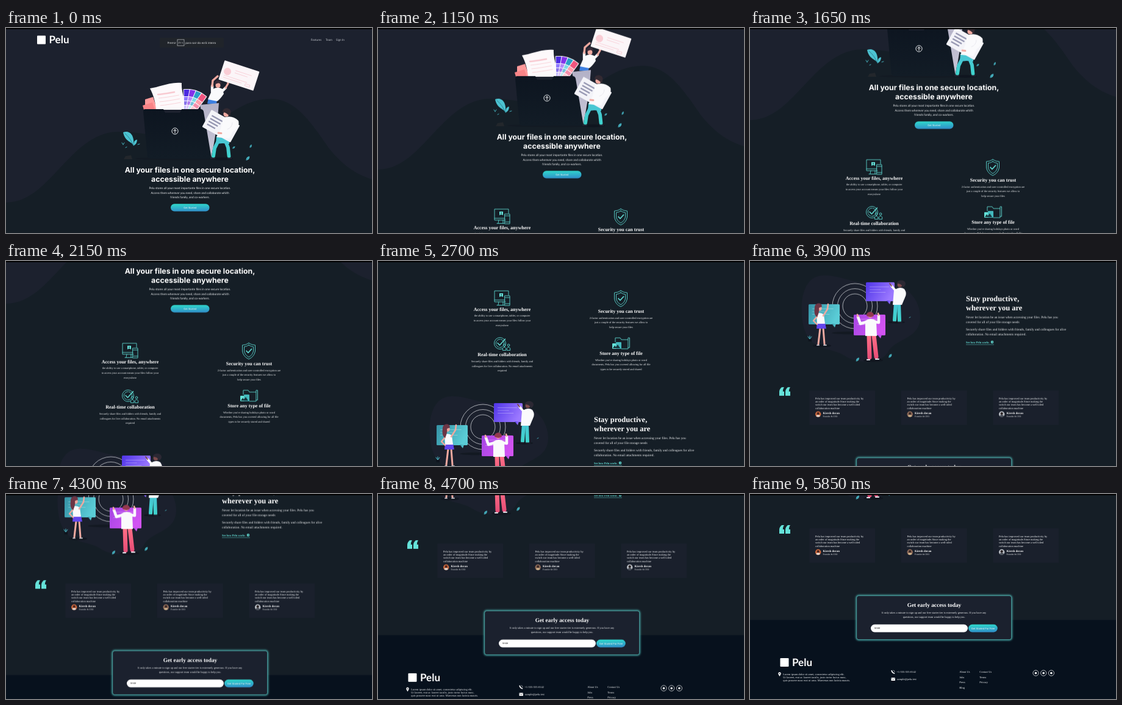
Write an HTML page that moves like this. It is 600 px wide and 336 px high and loops after 5.9 s.

```html
<!DOCTYPE html>
<html lang="en">
<head>
<meta charset="utf-8">
<title>Landing page scroll</title>
<style>
html, body { margin: 0; width: 100%; height: 100%; overflow: hidden; background: #151e26; }
#stage { position: relative; width: 600px; height: 336px; overflow: hidden; }
svg { position: absolute; left: 0; top: 0; display: block; }
#page { animation: scroll 5900ms linear infinite; will-change: transform; }
#toast { animation: toast 5900ms linear infinite; }
#bar { position: absolute; left: 0; top: 0; width: 600px; height: 2px; background: #000; }

@keyframes scroll {
  0%, 13.9% { transform: translateY(0); }
  19.492% { transform: translateY(-54px); }
  36.441% { transform: translateY(-216px); }
  54.237% { transform: translateY(-380px); }
  66.102% { transform: translateY(-500px); }
  79.661% { transform: translateY(-631px); }
  82.288%, 100% { transform: translateY(-656px); }
}
@keyframes toast {
  0%, 11% { opacity: 1; }
  15%, 100% { opacity: 0; }
}

text { fill: #f1f3f5; font-family: "Liberation Serif", serif; font-size: 4.5px; text-rendering: geometricPrecision; white-space: pre; }
.mid { text-anchor: middle; }
.brand { font: 700 17px Lato, sans-serif; fill: #fff; }
.hero { font: 700 12.3px Inter, sans-serif; fill: #fff; }
.intro { font: 4.8px Lato, sans-serif; }
.nav { font: 4.7px Lato, sans-serif; fill: #c3c7cd; }
.cta { font: 4.2px Lato, sans-serif; }
.feat { font-weight: 700; font-size: 8px; fill: #fff; }
.h2 { font-weight: 700; font-size: 12.5px; fill: #fff; }
.h3 { font-weight: 700; font-size: 9.375px; fill: #fff; }
.para { font-size: 5.4px; }
.link { font-weight: 700; fill: #65e2d9; }
.name { font-weight: 700; font-size: 4.8px; fill: #fff; }
.role { font-size: 3.6px; }
.ui { font: 4.17px "Liberation Sans", sans-serif; }
.dark { fill: #222; }
.tip { font: 4.5px "Open Sans", sans-serif; }
.icon { fill: none; stroke: #5cd5cf; stroke-width: .9; stroke-linejoin: round; stroke-linecap: round; }
.limb { fill: none; stroke-linecap: round; stroke-linejoin: round; }
</style>
</head>
<body>
<div id="stage">
  <svg id="page" width="600" height="992" viewBox="0 0 600 992"></svg>
  <svg id="toast" width="600" height="40" viewBox="0 0 600 40">
    <rect x="252" y="16" width="105" height="16" rx="1" fill="#20242a"/>
    <rect x="281" y="19" width="11" height="10" fill="none" stroke="#c4c6c9" stroke-width=".7"/>
    <text class="tip" x="264.5" y="25.8">Premir</text>
    <text class="tip mid" x="286.5" y="25.8">F11</text>
    <text class="tip" x="294.3" y="25.8">para sair do ecrã inteiro</text>
  </svg>
  <div id="bar"></div>
</div>
<script>
const BRAND = 'Pelu';
const SKIN = '#f0a9a0', TEAL = '#4cc3d1', WHITE = '#fafafc';

const text = (x, y, cls, s) => `<text x="${x}" y="${y}" class="${cls}">${s}</text>`;
const lines = (x, y, gap, cls, list) => list.map((s, i) => text(x, y + i * gap, cls, s)).join('');
const rect = (x, y, w, h, fill, rx = 0, more = '') =>
  `<rect x="${x}" y="${y}" width="${w}" height="${h}" rx="${rx}" fill="${fill}" ${more}/>`;
const circle = (x, y, r, fill, more = '') => `<circle cx="${x}" cy="${y}" r="${r}" fill="${fill}" ${more}/>`;
const oval = (x, y, rx, ry, fill) => `<ellipse cx="${x}" cy="${y}" rx="${rx}" ry="${ry}" fill="${fill}"/>`;
const shape = (d, fill, more = '') => `<path d="${d}" fill="${fill}" ${more}/>`;
const limb = (d, color, w) => `<path class="limb" d="${d}" stroke="${color}" stroke-width="${w}"/>`;
const at = (x, y, body, turn = 0) => `<g transform="translate(${x} ${y}) rotate(${turn})">${body}</g>`;
const icon = (x, y, d) => at(x, y, `<path class="icon" d="${d}"/>`);
const leaf = (x, y, turn, k = 1) => at(x, y,
  shape(`M0 ${4 * k}C${-3 * k} 0 ${-2 * k} ${-3 * k} 0 ${-5 * k}C${3 * k} ${-2 * k} ${2.5 * k} ${k} 0 ${4 * k}`, TEAL) +
  limb(`M0 ${4 * k}L0 ${-3 * k}`, '#123', .4), turn);
const grad = (id, a, b, x2, y2) =>
  `<linearGradient id="${id}" x2="${x2}" y2="${y2}"><stop stop-color="${a}"/><stop offset="1" stop-color="${b}"/></linearGradient>`;

const defs = () => '<defs>' +
  grad('btn', '#2fdacb', '#3093c9', .12, 1) + grad('violet', '#4f35e8', '#9b78ff', 1, .4) +
  grad('teal', '#3591a5', '#5accd6', 1, .3) + grad('pink', '#a546e4', '#d253f2', 1, .4) +
  grad('legs', '#ff6f86', '#e84f78', 0, 1) + grad('pants', '#48c6d4', '#3fd3cd', 0, 1) +
  grad('folder', '#0d1520', '#121c26', 0, 1) + grad('grey', '#b3b1c6', '#c9c7d8', 0, 1) +
  '<filter id="glow" x="-10%" y="-20%" width="120%" height="140%"><feGaussianBlur stdDeviation="1.6"/></filter></defs>';

const logo = (x, y) => rect(x + 3, y - 12.5, 14, 14, '#fff', 1) + text(x + 22.5, y, 'brand', BRAND);

function header() {
  return rect(0, 0, 600, 992, '#151e26') +
    shape('M0 0H600V248C575 240 555 228 530 198C502 158 476 116 434 116C374 116 345 172 290 177C245 180 225 170 185 170C105 170 73 286 0 286Z', '#1c212e') +
    logo(48, 25) +
    text(499.7, 21, 'nav', 'Features') + text(524, 21, 'nav', 'Team') + text(541, 21, 'nav', 'Sign In');
}

function certificate() {
  const bars = [[22, 10, 28], [22, 14, 22], [6, 23, 40], [6, 26.5, 32]];
  return at(358.5, 53, rect(0, 0, 60, 33, '#fbf5f8', 1) + circle(10, 16, 6, '#f9cdd5') +
    bars.map(([x, y, w]) => rect(x, y, w, .9, '#f8cfd7')).join('') +
    rect(44, 26, 8, 3.5, 'none', 0, 'stroke="#f5bcc7" stroke-width=".6"'), 18);
}

// Colour cards fanned out from one point behind the folder edge.
function swatches() {
  const tones = [['#4b2be0', '#8f78ff'], ['#8432ea', '#b889fa'], ['#2b9fc8', '#7edbe5'], ['#f0557f', '#ff9dab']];
  return tones.map(([a, b], i) => at(297, 148,
    rect(-5.5, -48, 11, 48, WHITE, 1) + rect(-4.5, -47, 9, 11, a) + rect(-4.5, -35, 9, 6, b) +
    rect(-4.5, -28, 9, 6, a, 0, 'opacity=".65"') + rect(-4.5, -21, 9, 7, b, 0, 'opacity=".5"'), i * 12.3 - 1)).join('');
}

function upperFigure() {
  return shape('M330 124L332 114L346 117L345 125Z', '#3d7fe0') +
    shape('M338 101Q346 95 355 100L357 108Q350 118 346 120L331 117Z', WHITE) +
    limb('M338 105L338 95', WHITE, 4.4) + limb('M355 103L360 98', WHITE, 4.2) +
    limb('M338 95L339 86L347 79', SKIN, 3.4) + limb('M360 98L364 91L364 83', SKIN, 3.2) +
    certificate() + circle(347.5, 94, 4, SKIN) +
    shape('M342 93C341 84 353 83 353.5 92C350 89 346 90 342 93Z', '#372a37');
}

function lowerFigure() {
  const note = [0, 1, 2, 3].map(i => rect(5, 7 + i * 5.3, 21 - i * 2, 2.3, '#9495b0')).join('');
  return oval(353, 214.5, 19, 2.2, '#0f151f') +
    limb('M349 183L342 197L340 210', 'url(#pants)', 5.8) + limb('M359 183L364 196L365.5 210', 'url(#pants)', 5.8) +
    shape('M345 177H366L366 190L355 189L344 190Z', '#49c7d3') +
    limb('M336 213.5H342M364 213.5H369', '#242635', 2.2) +
    at(337, 134, rect(0, 0, 53, 32, '#f3f3f8', 1) + note, 29) +
    shape('M356 147Q371 142 381 152Q384 162 372 169L366 181L345 179L352 165Z', WHITE) +
    limb('M372 150Q376 158 367 167L354 172', WHITE, 6) + limb('M371 155Q371 163 363 166', '#dcdce6', .6) +
    limb('M353 172.5L348 172', SKIN, 2.8) +
    circle(361, 141, 4.6, SKIN) + shape('M355 138C355 129 369 130 368.5 138L367 145C364 142 361 138 355 138Z', '#332a32');
}

function plants() {
  return shape('M209 193C207 186 195 187 192 171C204 167 211 177 209 193Z', TEAL) +
    limb('M209 193Q204 180 195 173', '#1b5a6d', .6) + shape('M209 193Q209 183 215 183Q215 190 209 193', TEAL) +
    limb('M192 191l-2 -3M192 191l2 -3M216 191l3 -1M198 195l-2 1', TEAL, .9) +
    shape('M193 215L196 210L205 208.5L207 215Z', '#23272c') +
    leaf(373, 196, 50, .65) + leaf(401, 194, 28, .7) + leaf(396, 214, 40);
}

function heroArt() {
  const sheet = [0, 1, 2, 3].map(i =>
    limb(`M${249 + i * 1.4} ${109 + i * 6}q12 -1 ${i ? 33 : 27} ${i ? -5 : -4}`, '#f8c9d0', i ? .8 : 2.4)).join('');
  return oval(292, 214, 80, 2.5, '#131a23') +
    shape('M228 117L241 113L248 134H228Z', '#ff9a9b') + shape('M224 127L240 122L244 134H226Z', '#f88487') +
    shape('M236 99C254 96 270 88 288 90C287 105 294 120 298 134H246C245 122 242 110 236 99Z', '#fdf9fb') + sheet +
    swatches() + upperFigure() +
    shape('M318 126L349 123Q346 170 336 213Z', 'url(#grey)') +
    shape('M228 133H258L261 139H285L288 133H319Q323 133 324 137L337 214H237Q232 214 231.5 209L225 137Q225 133 228 133Z', 'url(#folder)') +
    circle(277, 169, 5.1, 'none', 'stroke="#e9ecef" stroke-width="1"') +
    limb('M277 172V166.5M274.8 168.6L277 166.3L279.2 168.6', '#fff', 1) +
    lowerFigure() + plants();
}

function hero() {
  return heroArt() +
    lines(301.5, 237, 14.6, 'hero mid', ['All your files in one secure location,', 'accessible anywhere']) +
    lines(301.5, 263.8, 7.8, 'intro mid', [
      `${BRAND} stores all your most importante files in one secure location.`,
      'Access them wherever you need, share and collaborate whith',
      'friends family, and co-workers.']) +
    rect(270, 288.3, 63.5, 12.2, 'url(#btn)', 6.1) + text(301.7, 296, 'cta mid', 'Get Started');
}

function features() {
  const L = 203.5, R = 398.5;
  const people = [17, 24].map(x =>
    circle(x, 13, 1.8, '#151e26', 'class="icon"') +
    shape(`M${x - 2.7} 21.5V18Q${x} 14.5 ${x + 2.7} 18V21.5Z`, '#151e26', 'stroke="#5cd5cf" stroke-width=".9"')).join('');
  return icon(190, 350, 'M19 19H1V1H24V8M1 16H18M8 19L7 24M15 19V24M5 24.5H17M18 9H26V25H18ZM18 12H26M18 22H26') +
    at(190, 350, shape('M9 5H15V11L12 9.5L9 11Z', '#65e2d9') + circle(12, 7.4, .9, '#151e26')) +
    icon(387, 350, 'M11 .7Q16 4 21.5 4V14Q20 23 11 27Q2 23 .5 14V4Q6 4 11 .7ZM11 4Q15 6.5 18.5 6.7V14Q17 20.5 11 23.7Q5 20.5 3.5 14V6.7Q7 6.5 11 4Z') +
    at(387, 350, limb('M7 13.5L10 16.5L15.5 10.5', '#65e2d9', 1.7)) +
    at(190, 427, circle(10, 10, 9.5, 'none', 'class="icon"') + circle(10, 10, 6.7, 'none', 'class="icon" stroke-dasharray="5 1.5"') +
      limb('M6 9.5L9.5 13L18.5 3', '#65e2d9', 1.5) + people) +
    icon(384, 427, 'M5 8V1H13L15 4H26V19H15M26 4V1H28.5V17H26') +
    at(384, 427, rect(0, 10, 9, 9, '#65e2d9', 1) + rect(6, 8, 9, 11, '#43b9bd', 1) + shape('M1 18L4 13.5L6 16L9 12L13 18Z', '#17333b')) +
    text(L, 383.5, 'feat mid', 'Access your files, anywhere') +
    lines(L, 393, 7.8, 'mid', ['the ability to use a smartphone, tablet, or computer', 'to access your account means your files follow your', 'everywhere']) +
    text(R, 386.5, 'feat mid', 'Security you can trust') +
    lines(R, 396.5, 7.7, 'mid', ['2-factor authentication and user-controlled encryption are', 'just a couple of the security features we allow to', 'help secure your files']) +
    text(L, 457.9, 'feat mid', 'Real-time collaboration') +
    lines(L, 468, 7.7, 'mid', ['Securely share files and folders with friends, family and', 'colleagues for live collaboration. No email attachments', 'required']) +
    text(R, 455.7, 'feat mid', 'Store any type of file') +
    lines(R, 465.6, 7.8, 'mid', ['Whether you\'re sharing holidays photo or word', `documents, ${BRAND} has you covered allowing for all file`, 'types to be securely stored and shared']);
}

function bubble(x, y, w, h, fill) {
  const bars = [.68, .4, .56].map((k, i) => rect(x + 6, y + 7 + i * 4.5, w * k, 1.1, '#fff', .5, 'opacity=".3"')).join('');
  return rect(x, y, w, h, fill, 1.5) + shape(`M${x + w - 13} ${y + h - 1}h7l-2 6z`, fill) + bars;
}

function teamArt() {
  const rings = [20, 28.5, 37].map(r => circle(172, 74, r, 'none', 'stroke="#e6e8ec" stroke-width=".7"')).join('');
  const rightFigure =
    limb('M239 69L237 97', 'url(#pants)', 6) + limb('M244 69L245 98', 'url(#pants)', 6) + limb('M234 100H238M243 100.5H249', '#20212e', 2) +
    shape('M236 48Q246 41 253 46Q258 53 254 60L249 72H234Z', WHITE) + limb('M252 50L251 61L240 66', WHITE, 4.5) + limb('M238 48L232 41', WHITE, 3.6) + limb('M232 41L229 37', '#7b4a4b', 2) +
    circle(245.5, 39, 4, '#7b4a4b') + shape('M241 37C240 31 254 29 255 37Q255 42 250 43Q249 37 241 37Z', '#2b2833');
  const leftFigure =
    limb('M115 110L112 136', SKIN, 3) + limb('M120 110L122 136', SKIN, 3) + limb('M110 138H113M121 138H125', '#e9e6ee', 1.7) +
    shape('M110 101H123L125 111H109Z', '#6346ec') + shape('M109 87Q115 83 121 88L123 103H110Z', WHITE) +
    limb('M120 90L127 79L128 71', SKIN, 2.5) + limb('M110 91L104 98L110 104', SKIN, 2.4) +
    circle(114, 78, 3.7, SKIN) + shape('M106 76C106 68 118 67 118 75L113 77Q114 84 110 92Q104 89 106 76Z', '#6c3545');
  const frontFigure =
    limb('M195 122L196 158', 'url(#legs)', 7) + limb('M203 122L207 157', 'url(#legs)', 7) + limb('M192 162H196M206 161H211', '#e9e6ee', 2.2) +
    shape('M189 98Q198 92 207 98L208 123H189Z', WHITE) + limb('M191 100L181 103L177 92', WHITE, 4.5) + limb('M205 100L211 101L211 90', WHITE, 4.5) +
    limb('M177 91L176 88M211 89L210 86', SKIN, 2.6) + circle(197, 89, 4.4, SKIN) + shape('M191 90C190 82 203 81 203 90Q198 94 191 90Z', '#93394f');
  return at(0, 500,
    shape('M118 24C148 22 170 40 212 36C258 32 280 66 279 94C277 130 237 126 226 150C216 168 176 169 156 156C132 140 102 150 89 112C80 82 82 26 118 24Z', '#1b202d') +
    oval(160, 118, 26, 2.2, '#131922') + oval(240, 100.5, 14, 1.9, '#11161f') + oval(118, 139, 15, 2.3, '#11161f') + oval(202, 163, 16, 2.4, '#11161f') +
    rings + bubble(190, 35, 47, 31, 'url(#violet)') + bubble(96, 71, 51, 33, 'url(#teal)') +
    rightFigure + leftFigure + bubble(170, 88, 52, 34, 'url(#pink)') + frontFigure +
    leaf(176, 162, 40, .9) + leaf(229.5, 156, 38, .9) +
    limb('M98 128L95 124M98 128V123M98 128L101 124', TEAL, 1) + rect(95.5, 128, 5.5, 4, '#0e141d', .5) + limb('M261 93l2 -1', TEAL, .8));
}

function productive() {
  return teamArt() +
    lines(354, 566, 14.7, 'h2', ['Stay productive,', 'wherever you are']) +
    lines(354, 593.8, 8, 'para', [`Never let location be an issue when accessing your files. ${BRAND} has you`, 'covered for all of your file storage needs']) +
    lines(354, 614.2, 8, 'para', ['Securely share files and folders with friends, family and colleagues for alive', 'collaboration. No email attachments required.']) +
    text(354, 634.7, 'link', `See how ${BRAND} works`) +
    circle(397, 633, 2.3, '#65e2d9') + limb('M395.9 633H398M397.2 632.1L398.1 633L397.2 633.9', '#151e26', .5) +
    rect(354, 636.8, 46, .5, '#65e2d9');
}

function avatar(x, y, back, body, head) {
  return circle(x, y, 4.7, back) + shape(`M${x - 3.6} ${y + 3}Q${x} ${y - 1} ${x + 3.6} ${y + 3}Q${x} ${y + 6.2} ${x - 3.6} ${y + 3}`, body) + circle(x, y - 1, 2.1, head);
}

function quotes() {
  const mark = shape('M4 0H8Q5.6 3 5.8 7H8V14H0V8Q0 3 4 0Z', '#65e2d9');
  const tones = [['#c9683e', '#e9ddd5', '#4c251f'], ['#8d6a58', '#d0b48e', '#3a2a27'], ['#b9bdc3', '#404650', '#2b2526']];
  return at(48, 707, mark) + at(58, 707, mark) + tones.map((tone, i) => {
    const x = 97.3 + i * 150.5;
    return rect(x, 712.3, 108, 56.5, '#1a202c', 1) +
      lines(x + 9.6, 726.6, 5.3, '', [`${BRAND} has improved our team productivity by`, 'an order of magnitude.Since making the', 'switch our team has become a well-oiled', 'collaboration machine']) +
      avatar(x + 14.4, 751.2, ...tone) + text(x + 22.2, 751, 'name', 'Kiresh dovan') + text(x + 22.2, 755.6, 'role', 'Founder &amp; CEO');
  }).join('');
}

function signup() {
  return rect(0, 862.5, 600, 130, '#07111d') +
    rect(174.7, 822.7, 254, 72, 'none', 3.5, 'stroke="#4fc4bf" stroke-width="2.2" filter="url(#glow)"') +
    rect(174.7, 822.7, 254, 72, '#1b212e', 3.5, 'stroke="#4fa9a8" stroke-width=".9"') +
    text(302, 841, 'h3 mid', 'Get early access today') +
    lines(301.7, 852.3, 6.6, 'mid', ['It only takes a minute to sign up and our free starter tier is extremely generous. If you have any', 'questions, our support team would be happy to help you.']) +
    rect(198, 869.8, 159, 12.6, '#fff', 6.3) + text(204.2, 877.4, 'ui dark', 'teste') +
    rect(358, 869.8, 47.8, 12.6, 'url(#btn)', 6.3) + text(381.9, 877.5, 'ui mid', 'Get Started For Free');
}

function footer() {
  const pin = shape('M48.5 955Q46.3 952 46.3 950.3A2.2 2.2 0 0 1 50.7 950.3Q50.7 952 48.5 955Z', '#fff') + circle(48.5, 950.4, .8, '#07111d');
  const phone = limb('M232.2 945.5Q233 949 236.6 950', '#fff', 1.6) + limb('M235 945Q237 945.4 237.2 947.4', '#fff', .6);
  const mail = rect(231.5, 957, 6.4, 5, '#fff', .5) + limb('M232.2 958L234.7 960L237.2 958', '#07111d', .6);
  const social = [468.5, 481.2, 493.9].map(x =>
    circle(x, 949.5, 4.6, 'none', 'stroke="#fff" stroke-width=".7"') + circle(x, 949.5, 1.8, '#fff')).join('');
  return logo(46.5, 937.5) + pin + phone + mail + social +
    lines(54.3, 952.6, 5.2, '', ['Lorem ipsum dolor sit amet, consectetur adipiscing elit.', 'Ut laoreet, erat ac laoreet iaculis, justo tortor luctus nunc,', 'quis posuere nunc erat ut urna. Maecenas non lacinia mauris.']) +
    text(240.3, 949, '', '+1-555-555-0142') + text(240.7, 961, '', 'sample@pelu.test') +
    lines(343.2, 949, 8.5, '', ['About Us', 'Jobs', 'Press', 'Blog']) +
    lines(376.2, 949, 8.5, '', ['Contact Us', 'Terms', 'Privacy']);
}

document.getElementById('page').innerHTML =
  [defs, header, hero, features, productive, quotes, signup, footer].map(part => part()).join('');
</script>
</body>
</html>
```
